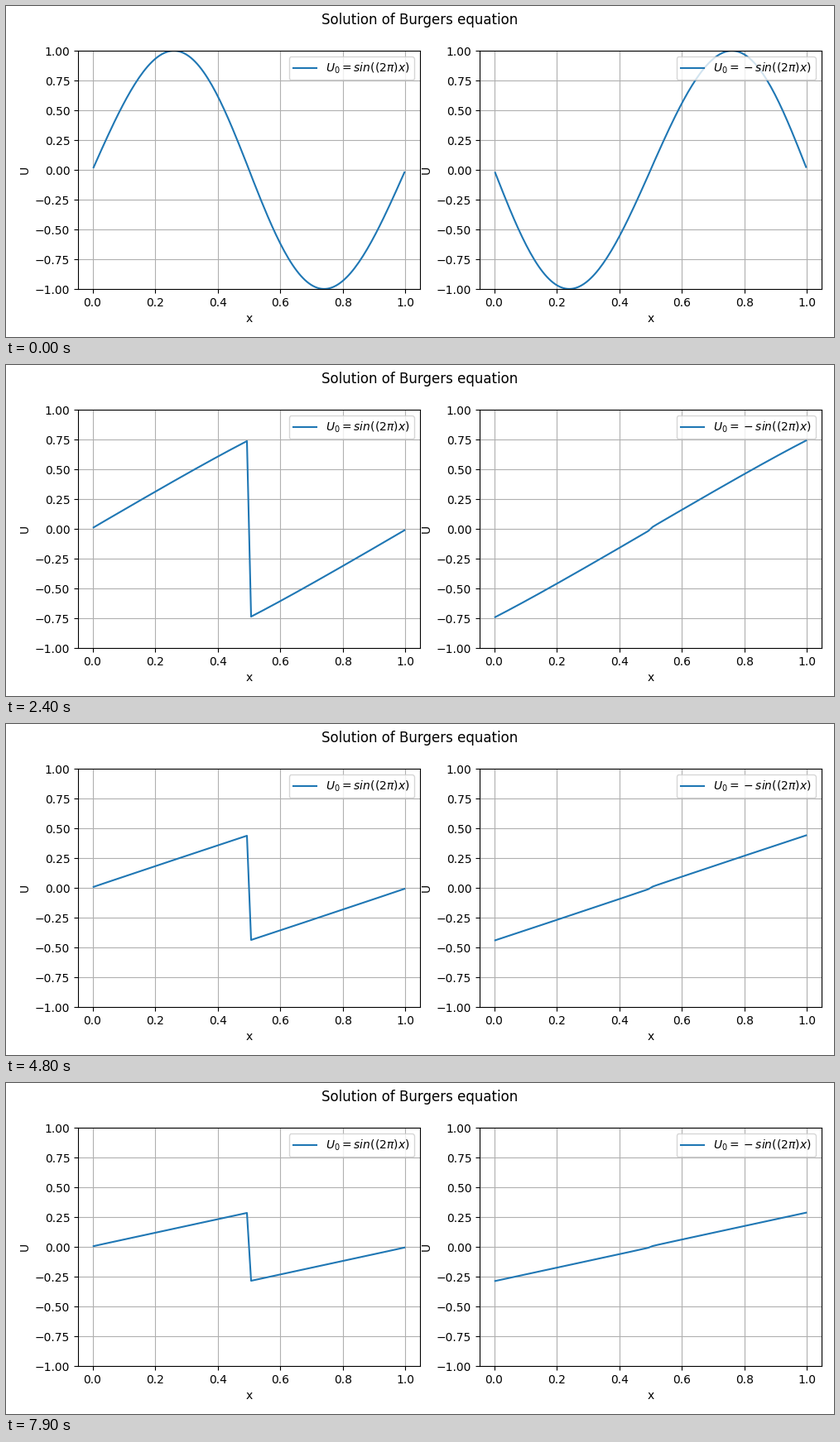
Write a matplotlib script that moves like this. It is 1000 px wide and 400 px high and loops after 8 s.

```python
import numpy as np
import matplotlib.pyplot as plt
from matplotlib.animation import FuncAnimation

W, H, DPI = 1000, 400, 100
FRAMES, INTERVAL = 80, 100

CELLS = 151
DX = 1 / CELLS
DT = 0.01 / 3
FIRST, STRIDE = 3, 6  # solver steps before the first frame and between frames

x = (np.arange(CELLS) + 0.5) * DX


def step(u):
    """One Godunov step of u_t + (u^2/2)_x = 0 on a periodic grid."""
    right = np.roll(u, -1)
    flux = np.maximum(np.maximum(u, 0) ** 2, np.minimum(right, 0) ** 2) / 2
    return u - DT / DX * (flux - np.roll(flux, 1))


def solve(u):
    states = []
    for k in range(FIRST + STRIDE * (FRAMES - 1) + 1):
        if k >= FIRST and (k - FIRST) % STRIDE == 0:
            states.append(u)
        u = step(u)
    return states


def panel(left, label, u):
    ax = fig.add_axes([left / W, 58 / H, 413 / W, 288 / H])
    line, = ax.plot(x, u, label=label)
    ax.set_ylim(-1, 1)
    ax.set_xlabel("x")
    ax.set_ylabel("U")
    ax.grid()
    ax.legend(loc="upper right")
    return line


wave = np.sin(2 * np.pi * x)
runs = [solve(wave), solve(-wave)]

fig = plt.figure(figsize=(W / DPI, H / DPI), dpi=DPI)
fig.suptitle("Solution of Burgers equation")
lines = [
    panel(87, r"$U_0 = sin((2\pi)x)$", runs[0][0]),
    panel(572, r"$U_0 = {} - sin((2\pi)x)$", runs[1][0]),
]


def draw(i):
    for line, states in zip(lines, runs):
        line.set_ydata(states[i])
    return lines


anim = FuncAnimation(fig, draw, frames=FRAMES, interval=INTERVAL,
                     repeat=True, repeat_delay=0)
plt.show()
```
